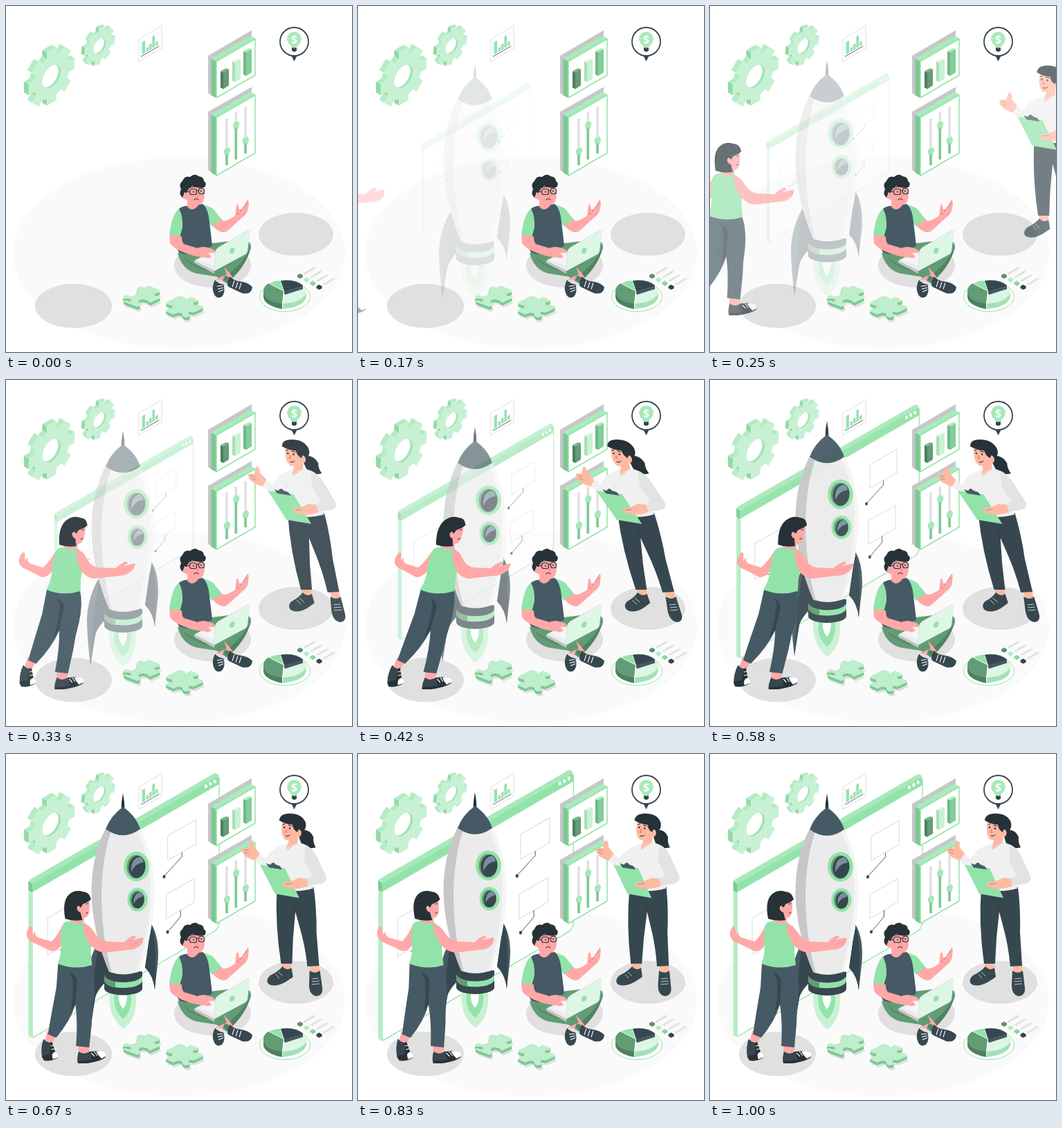
An HTML page for the animation above (1.04 s loop, 500 by 500 pixels).

```html
<!DOCTYPE html>
<html lang="en">
<head>
<meta charset="utf-8">
<title>Project launch</title>
<style>
html, body { margin: 0; width: 100%; height: 100%; overflow: hidden; background: #fff }
svg { display: block; width: 100%; height: 100% }
.g { fill: #92e3a9 } .l { fill: #c8f1d4 } .k { fill: #7bc993 } .m { fill: #629c74 }
.t { fill: #455a64 } .d { fill: #37474f } .n { fill: #263238 }
.s { fill: #ffa8a7 } .p { fill: #ffb9a3 } .w { fill: #fff } .e { fill: #e0e0e0 } .c { fill: #c7c7c7 }
.line { fill: none; stroke: #e0e0e0 }
.lace { fill: none; stroke: #fff; stroke-width: 1.1 }
.ink { fill: none; stroke: #263238; stroke-linecap: round }
.fold { fill: none; stroke: #263238; stroke-opacity: .45; stroke-width: .8 }
</style>
</head>
<body>
<svg viewBox="0 0 500 500">
<defs><clipPath id="hole"><circle r="15.5"/></clipPath></defs>

<!-- floor -->
<ellipse cx="250" cy="357" rx="240" ry="138" fill="#fafafa"/>
<g class="e">
  <ellipse cx="97.500" cy="433.500" rx="55.500" ry="32"/>
  <ellipse cx="298.500" cy="375" rx="55.500" ry="32"/>
  <ellipse cx="419" cy="330" rx="54" ry="31"/>
</g>
<g id="gears"></g>

<!-- small chart -->
<path class="w" stroke="#e0e0e0" d="M192 48L225 28.500V61L192 80Z"/>
<path class="g" d="M197 52l4-2.300v18l-4 2.300zM202.500 61l3.500-2v5.500l-3.500 2zM207 56l3.500-2v8l-3.500 2zM211.500 44l3.500-2v17l-3.500 2zM216 52l3.500-2v6l-3.500 2z"/>
<path class="line" d="M195.500 51V73"/>
<path class="ink" d="M195.500 73L221 58" stroke-width=".9" style="stroke:#455a64"/>

<!-- window -->
<g id="win">
  <path class="w" stroke="#92e3a9" stroke-width="1.300" d="M39 188L303 35Q307 33 307 38V242Q307 251 300 256L42 407Q39 409 39 405Z"/>
  <path fill="#b5edc5" d="M33.500 185L39 188V408.500L35 407Q33.500 406 33.500 403Z"/>
  <path fill="#a7e9ba" d="M33.500 185Q33.500 183 36 181.500L299 30Q302 28.500 304 30L307 33L39 189Z"/>
  <path class="g" d="M39 188L303 35Q307 33 307 38V45L39 200Z"/>
  <path class="k" d="M33.500 184L39 188V200L33.500 197Z"/>
  <g class="w"><ellipse cx="288" cy="48" rx="2" ry="2.700"/><ellipse cx="294.300" cy="44.500" rx="2" ry="2.700"/><ellipse cx="300.600" cy="41" rx="2" ry="2.700"/></g>
  <path class="line" stroke-width="1.200" d="M233 119L273.500 96V131L233 154ZM231 203L271.500 180V214L231 238ZM61 237L103 213V266L61 290Z"/>
  <path class="ink" stroke-width=".8" d="M253.500 143V149L228 177M251.500 226V235L233 257M79 283H84L104 272"/>
  <g class="d"><ellipse cx="228" cy="177.500" rx="2" ry="2.500"/><ellipse cx="233" cy="257" rx="2" ry="2.500"/></g>
</g>

<!-- wall panels -->
<path class="c" d="M292 72L355 35V95L297 129L292 126ZM292 153L355 117V205L297 240L292 237Z"/>
<path class="k" d="M296.500 76L304 80V133L296.500 129ZM296.500 157L304 161V245L296.500 241Z"/>
<path fill="#a8ebbc" d="M296.500 76L353 43L360.500 47L304 80ZM296.500 157L353 124L360.500 128L304 161Z"/>
<path class="w" stroke="#92e3a9" stroke-width="1.500" stroke-linejoin="round" d="M304 80L360 47.500V100L304 132.500ZM304 161L360 128.500V212.500L304 245Z"/>
<g id="bars"></g>
<g id="sliders"></g>

<!-- idea pin -->
<path class="d" d="M412 71L416.500 80L421 71Z"/>
<circle class="w" cx="416.500" cy="51.500" r="20.500" stroke="#37474f" stroke-width="1.800"/>
<path fill="#a9e9bb" d="M413 61Q413 58 410 55.500A10.300 10.300 0 1 1 423 55.500Q420 58 420 61Z"/>
<path class="d" d="M413 60.500H420V64.500Q416.500 68 413 64.500Z"/>
<text x="416.500" y="53.500" text-anchor="middle" font-family="'Open Sans',sans-serif" font-weight="700" font-size="16" fill="#fff">$</text>

<!-- rocket -->
<g id="rocket">
  <path class="l" d="M150 340Q147 362 154 378Q160 390 169.500 398Q180 390 185 377Q190 362 187 340Z"/>
  <path class="g" d="M157 344Q155 362 160 372Q164 379 169 383Q175 379 178 371Q183 360 180 343Z"/>
  <path class="w" d="M163 345Q161 359 169 369Q177 359 174 345Z"/>
  <path class="t" d="M136 267Q119 295 117 328Q117 355 122 397Q126 370 129 352Q132 340 152 322Z"/>
  <path class="d" d="M136 267Q127 300 122 397Q126 370 129 352Q132 340 152 322Z"/>
  <path class="t" d="M210 246Q222 266 219.500 300L215 341Q213 321 201 309Z"/>
  <path class="d" d="M210 246Q219 274 215 341Q213 321 201 309Z"/>
  <path class="d" d="M142 315Q169 310 197 315V340Q194 348 169 349Q145 348 142 340Z"/>
  <path class="g" d="M142 321Q147 330 169 330.500Q192 330 197 321V329Q192 338 169 338.500Q147 338 142 329Z"/>
  <path class="m" d="M142 321Q147 329 158 330V338Q147 337 142 329Z"/>
  <path fill="#ebebeb" d="M144 108Q123 150 123.500 202Q125 258 149 315Q169 323 192 315Q213 264 214.500 200Q214 148 194 108Z"/>
  <path class="c" d="M144 108Q123 150 123.500 202Q125 258 149 315L153 317Q138 265 138 202Q139 150 152 112Z"/>
  <path fill="#f5f5f5" d="M194 108Q214 148 214.500 200Q213 264 192 315L189 316Q208 255 209 200Q208 148 189 111Z"/>
  <path class="n" d="M169 57Q171.500 69 171.500 82H166.500Q166.500 69 169 57Z"/>
  <path class="t" d="M169 77Q151 90 144 109Q169 127 194 109Q188 90 169 77Z"/>
  <ellipse class="g" cx="188.500" cy="163" rx="18.500" ry="21.500"/>
  <ellipse class="m" cx="188" cy="163.500" rx="13.500" ry="17"/>
  <ellipse class="d" cx="189.500" cy="163.500" rx="12" ry="16" transform="rotate(8 189 163)"/>
  <path fill="#78909c" d="M181 171Q180 152 193 149Q198 150 199 157Q187 158 181 171Z"/>
  <ellipse class="g" cx="190" cy="211" rx="14.500" ry="17"/>
  <ellipse class="m" cx="189.500" cy="211" rx="10.500" ry="13"/>
  <ellipse class="d" cx="190.700" cy="211.500" rx="9" ry="12" transform="rotate(8 190 211)"/>
  <path fill="#78909c" d="M184 217Q184 203 193 200Q197 201 198 206Q189 208 184 217Z"/>
</g>

<!-- jigsaw pieces -->
<g id="jigsaw"></g>

<!-- pie -->
<ellipse class="w" cx="403" cy="420" rx="36.500" ry="21.500" stroke="#92e3a9"/>
<path fill="#4c8060" d="M372 412V421Q374 433 399 438V418Z"/>
<path class="m" d="M401 412L379 401Q371 406 372 415Q376 428 399 430Z"/>
<path class="g" d="M401 411L381 401Q388 397 396 397Z"/>
<path fill="#a6dfb7" d="M434 410V420Q432 434 400 438V429Z"/>
<path fill="#dcf6e4" d="M403 413L429 404Q436 411 433 417Q424 429 400 430Z"/>
<path class="t" d="M402 411V416L404 417L429 409V403Z"/>
<path class="d" d="M402 412L397 397Q418 394 429 404Z"/>
<g id="legend"></g>

<!-- seated man -->
<path class="m" d="M248 357Q255 383 278 387L304 391L319 401Q346 376 354 350Q355 339 342 337.500L297 343Z"/>
<path fill="#4f8462" d="M326 384Q343 370 353 351Q346 378 320 400L314 394Z"/>
<path class="fold" d="M258 365Q275 380 300 384"/>
<path class="s" d="M303 395L313 397L316 389L325 393L330 396L324 387L315 377L319 388Z"/>
<path class="d" d="M302 396Q296 407 301 417Q305 424 312 420Q318 413 314 402Q308 402 302 396ZM324 391Q317 402 322 406L341 415Q355 418 356 406Q351 400 339 398Q330 398 324 391Z"/>
<path class="lace" d="M305 405l8-1M306 409l8-2M307 413l7-3M330 397l-3 9M335 399l-3 9M340 400l-3 9"/>
<path class="g" d="M250 293Q240 300 236 331L254 334L260 300ZM285 287Q299 290 304 299L313 310L298 319L288 306Z"/>
<path class="s" d="M299 317L310 309Q318 313 331 303L333 288Q336 284 337 294L341 294L349 280Q352 281 350 291Q350 300 342 305L320 325Q311 331 299 318Z"/>
<path class="fold" d="M338 297L348 284M334 299l3 2"/>
<path class="t" d="M250 293Q257 288 266 289L284 286Q292 292 294 312L298 346Q275 366 250 356L247 350L255 320Q256 304 250 293Z"/>
<path class="s" d="M262 280V290Q269 299 278 288L277 280Z"/>
<path class="s" d="M260 264Q262 255 276 255Q287 260 287 272Q287 284 280 287Q270 290 262 281L256 278Q249 272 255 268Z"/>
<path class="n" d="M255 277Q249 271 253 265Q249 257 255 253Q258 245 266 247Q273 241 278 246Q286 247 286 253Q291 256 287 262Q277 264 269 260Q263 264 261 270L258 269Z"/>
<g class="ink" stroke-width="1.100"><rect x="265.500" y="264.500" width="10" height="8" rx="3"/><rect x="278.500" y="263.500" width="8" height="8" rx="3"/><path d="M275 267L278.500 266.500M260 269L265 268M266.500 262L273 261M280 260.500L285 261M272 280Q275 277 278 280"/></g>
<circle class="n" cx="271" cy="268.500" r="1.100"/><circle class="n" cx="282" cy="267.500" r="1.100"/>
<path fill="#ff8f8c" d="M277 269L278 276L275 275Z"/>
<path class="s" d="M236 331L254 333Q254 341 257 344L277 350Q289 346 300 352Q304 357 299 359L291 357L296 362Q294 366 286 363L271 361Q241 352 237 342Z"/>
<path fill="#ebebeb" d="M272 368L298 354L328 367L301 383Z"/>
<path class="c" d="M272 368V371L301 387V383Z"/>
<path fill="#f5f5f5" d="M279 367L298 357L315 365L299 375Z"/>
<path class="s" d="M278 349Q291 346 301 354Q303 357 298 357L291 356L297 362Q294 366 286 363L276 362Z"/>
<path fill="#def6e6" d="M301 383L302 359Q302 352 307 349L350 324Q353 323 352.500 327L349 354Q348 358 344 360Z"/>
<path class="line" d="M301 383L302 359Q302 352 307 349L350 324"/>
<ellipse class="g" cx="327" cy="353.500" rx="3.500" ry="4.500" transform="rotate(25 327 353)"/>

<!-- woman with clipboard -->
<g id="right">
  <path class="p" d="M396 298H411V311L399 315ZM436 302H451V315L440 318Z"/>
  <path class="d" d="M398 307Q391 315 380 320Q373 326 377 332Q385 338 401 330Q409 325 413 322L411 309Q404 314 398 307ZM437 313L436 334Q436 348 446 350Q456 349 455 338L452 313Q445 319 437 313Z"/>
  <path class="lace" d="M392 315l6 6M388 318l5 6M440 325l10-1M440 329l11-1M440 333l11-1" style="stroke-width:.7"/>
  <path class="d" d="M392 193Q420 202 445 192Q449 225 448 258L451 306L434 307Q431 276 424 251L418 228L414 266L412 303H396Q388 246 392 193Z"/>
  <path class="fold" d="M418 229L416 211Q409 210 403 203"/>
  <path class="n" d="M426 110Q441 107 446 120Q445 128 449 135Q439 138 430 132Q427 128 425 119Z"/>
  <path fill="#f0f0f0" d="M393 135L410 128Q430 126 440 135Q444 145 443 190Q444 194 445 194Q418 202 391 194L391 164Q374 169 359 152L366 143L376 151Q385 139 393 135Z"/>
  <path class="p" d="M412 118L409 130Q405 137 409 138L423 128L424 120Z"/>
  <path class="p" d="M402 96Q397 114 404 123Q410 127 419 120L427 119Q431 113 426 108L421 98Z"/>
  <path class="n" d="M397 96Q398 86 412 86Q430 86 435 99Q437 109 429 113Q425 105 423 113Q417 110 416 102Q407 102 397 96Z"/>
  <path class="ink" stroke-width="1" d="M402 102l3-1M410 103l5 1M406 118Q409 120 412 117"/>
  <circle class="n" cx="404" cy="106" r="1.300"/><circle class="n" cx="412" cy="107.500" r="1.300"/>
  <path fill="#ef8876" d="M407 107L404 114L408 114Z"/>
  <path class="line" d="M391 164Q394 154 398 150M406 138L412 133L424 129"/>
  <path class="p" d="M361 154Q347 150 343 142Q341 136 346 135L352 136Q353 130 356 125Q361 125 360 134L368 144Z"/>
  <path class="fold" d="M346 138l6 2M346 142l6 2"/>
  <path class="g" d="M368 160L404 165L424 208L389 202Z"/>
  <path class="t" d="M377 158L383 160Q387 154 391 160L397 162L400 167L381 164Z"/>
  <path fill="#e3e3e3" d="M434 131Q445 136 451 150L464 178Q464 186 454 188L434 191V180L443 176L432 154Z"/>
  <path class="p" d="M435 180L424 179L412 184L401 185Q398 190 405 193Q419 197 437 191Z"/>
  <path class="fold" d="M404 188L414 187"/>
</g>

<!-- woman by the rocket -->
<g id="left">
  <path class="s" d="M61 400L74 405L69 418L58 415ZM106 419H122V434L107 435Z"/>
  <path class="n" d="M56 412Q52 423 54 438L57 443Q69 445 78 438Q80 434 73 430L68 416Q62 419 56 412ZM107 430Q104 440 106 447H119Q140 444 146 438Q147 430 137 429L123 430Q114 436 107 430Z"/>
  <path class="d" d="M56 412Q52 423 54 436L65 434L66 417Q61 418 56 412ZM107 430Q105 438 106 444L127 442L123 431Q114 436 107 430Z"/>
  <path class="w" d="M137 429Q148 430 146 437L140 440Q134 434 132 430ZM73 430Q80 434 78 438L70 441Q68 436 69 433Z"/>
  <path class="lace" d="M125 432l5 5M129 430l5 6M66 422l5-1M67 427l6-1"/>
  <path class="t" d="M75 302Q99 312 123 304Q130 322 128 350Q125 370 125 390L122 424L103 422Q105 387 101 362Q94 386 74 410L62 405Q67 372 73 338Z"/>
  <path class="d" d="M101 362L103 326Q99 319 91 315Q97 322 97 332Q98 350 94 372Z"/>
  <path class="s" d="M81 246Q73 263 65 271L45 265Q40 261 41 256Q39 258 38 262L36 250L33 249Q28 255 29 263Q32 271 42 274L65 285Q74 285 80 275L86 256Z"/>
  <path class="g" d="M82 244Q92 239 111 243Q120 248 123 263L122 287L124 305Q100 313 74 303Q79 292 79 279Q76 256 82 244Z"/>
  <path class="s" d="M110 245Q119 246 126 257Q134 270 146 271L170 272Q175 266 184 262L187 265L181 269L197 265Q199 267 195 275Q188 283 176 283L141 287Q126 285 117 270Q109 254 110 245Z"/>
  <path class="fold" d="M182 276L194 270" style="stroke:#e47473"/>
  <path class="s" d="M94 236L111 234V243Q101 248 91 241Z"/>
  <path class="s" d="M102 216L118 209Q120 220 118 230Q116 238 109 237L101 232Z"/>
  <path class="n" d="M84 238Q79 213 89 203Q98 195 109 199Q118 199 121 210Q116 215 109 217Q108 220 106 222Q103 217 101 221Q100 227 106 229L109 240Q95 242 84 238Z"/>
  <path class="ink" stroke-width=".9" d="M114 217l3-1M114 230l3-1"/>
</g>
</svg>
<script>
const $ = id => document.getElementById(id);
const poly = (pts, fill) => `<polygon points="${pts.map(p => p.join()).join(' ')}" fill="${fill}"/>`;

// Eight-toothed wheel on the isometric wall plane, with visible tooth sides
function gear(cx, cy, scale, spin) {
  const front = [], dx = -7 * scale, dy = -4 * scale;
  for (let i = 0; i < 8; i++) {
    for (const [turn, r] of [[-.26, 30], [-.2, 39], [.2, 39], [.26, 30]]) {
      const a = spin + i * Math.PI / 4 + turn, u = r * scale * Math.cos(a), v = r * scale * Math.sin(a);
      front.push([cx + .866 * u, cy - v - .5 * u]);
    }
  }
  const sides = front.map((a, i) => {
    const b = front[(i + 1) % front.length], ex = b[0] - a[0], ey = b[1] - a[1];
    if (-ey * dx + ex * dy < 0) return '';
    const fill = ex > 2 ? '#8fd5a5' : ex < -2 ? '#b4edc4' : '#92d9a7';
    return poly([a, b, [b[0] + dx, b[1] + dy], [a[0] + dx, a[1] + dy]], fill);
  }).join('');
  const bore = `<g transform="matrix(${.866 * scale} ${-.5 * scale} 0 ${scale} ${cx} ${cy})" clip-path="url(#hole)">
    <circle r="16" fill="#a5e4b7"/><circle cx="-4" cy="-3" r="15" fill="#fff"/></g>`;
  return sides + poly(front, '#c8f1d4') + bore;
}
$('gears').innerHTML = gear(66, 102, 1, 0) + gear(135.5, 58, .665, -.17);

const bar = (x, y, h, face, side, top) =>
  poly([[x, y], [x + 4, y + 2], [x + 4, y + h], [x, y + h - 2]], side) +
  poly([[x + 4, y + 2], [x + 12, y - 3], [x + 12, y + h - 5], [x + 4, y + h]], face) +
  poly([[x, y], [x + 8, y - 4], [x + 12, y - 3], [x + 4, y + 2]], top);
$('bars').innerHTML = bar(310, 94, 26, '#629c74', '#4c8060', '#76b388') +
  bar(327, 80, 30, '#c8f1d4', '#a6dfb7', '#def6e6') + bar(343, 65, 36, '#83ce99', '#6db984', '#a8ebbc');

$('sliders').innerHTML = [[319, 162, 230, 210], [332.3, 154, 222, 172], [346, 146, 213, 194]].map(([x, top, end, y]) =>
  `<path d="M${x} ${top}V${end}" stroke="#e0e0e0" stroke-width="3.500"/><path d="M${x} ${y}V${end}" stroke="#7bc993" stroke-width="3.500"/>
   <ellipse cx="${x}" cy="${y + 1}" rx="3.800" ry="5.500" class="k"/><ellipse cx="${x + .6}" cy="${y - .5}" rx="4" ry="5.500" fill="#a8e8ba" transform="rotate(25 ${x} ${y})"/>`).join('');

const pieces = [
  'M169 423Q169 418 175 418L181 420Q187 418 190 416Q186 408 194 405L200 407L206 404L221 410Q224 413 219 415Q213 415 215 418L223 422L208 429Q204 424 197 424Q189 425 193 430Q195 434 190 435L177 430Q167 427 171 425L179 427Q184 425 178 423Z',
  'M232 428L244 422Q248 418 255 420Q261 421 259 425L267 420L278 425Q277 429 271 428Q269 432 276 433Q287 432 284 437L271 443Q263 440 264 445Q268 449 262 450Q254 450 255 445Q250 441 242 446L231 441Q232 437 239 437Q243 433 236 432Q230 431 232 428Z'
];
$('jigsaw').innerHTML = pieces.map(d =>
  `<path d="${d}" transform="translate(2 7)" class="e"/>` +
  [4, 3, 2, 1].map(y => `<path d="${d}" transform="translate(0 ${y})" class="k"/>`).join('') +
  `<path d="${d}" fill="#bfeecc"/>`).join('');

$('legend').innerHTML = ['#629c74', '#c8f1d4', '#92e3a9', '#37474f'].map((fill, i) => {
  const x = 425 + 9.2 * i, y = 390 + 5.3 * i;
  return poly([[x - 4, y - 1], [x, y - 3.500], [x + 4, y - 1], [x + 4, y + 2], [x, y + 4], [x - 4, y + 2]], fill) +
    `<path d="M${x - 4} ${y - 1}l4 2l4-2M${x} ${y + 1}v3" fill="none" stroke="#263238" stroke-opacity=".25" stroke-width=".7"/>
     <path d="M${x + 6} ${y - 3}l15.500-9" stroke="#e0e0e0" stroke-width="2.700"/>`;
}).join('');

// cubic-bezier(.36, -.01, .5, 1.38)
function ease(x) {
  if (x <= 0 || x >= 1) return x <= 0 ? 0 : 1;
  const curve = (s, a, b) => 3 * a * s * (1 - s) ** 2 + 3 * b * s * s * (1 - s) + s ** 3;
  let lo = 0, hi = 1;
  for (let i = 0; i < 24; i++) {
    const mid = (lo + hi) / 2;
    curve(mid, .36, .5) < x ? lo = mid : hi = mid;
  }
  return curve(lo, -.01, 1.38);
}

function place(id, transform, opacity) {
  $(id).setAttribute('transform', transform);
  $(id).setAttribute('opacity', Math.max(0, Math.min(1, opacity)));
}

// Dash in from one side, lean over, then settle upright
function dash(id, time, side, midY) {
  let shift = 0, lean, opacity = 1;
  if (time < .6) {
    opacity = ease(time / .6);
    shift = 250 * (1 - opacity);
    lean = 20 - 30 * opacity;
  } else if (time < .8) lean = -10 + 12 * ease((time - .6) / .2);
  else lean = 2 - 2 * ease((time - .8) / .2);
  place(id, `translate(${side * shift} ${midY}) skewX(${-side * lean}) translate(0 ${-midY})`, opacity);
}

const LOOP = 1040, FPS = 24, LEAD = .034;
function draw(now) {
  const step = Math.floor((now % LOOP + 4) * FPS / 1000);
  const time = step < 2 ? 0 : Math.min(1, step / FPS + LEAD);
  const p = ease(time);
  place('win', `translate(170 220) scale(${.5 + .5 * p}) translate(-170 -220)`, p);
  place('rocket', `translate(0 ${30 * (1 - p)})`, p);
  dash('left', time, -1, 322);
  dash('right', time, 1, 218);
}
function tick() {
  draw(performance.now());
  requestAnimationFrame(tick);
}
tick();
</script>
</body>
</html>
```
